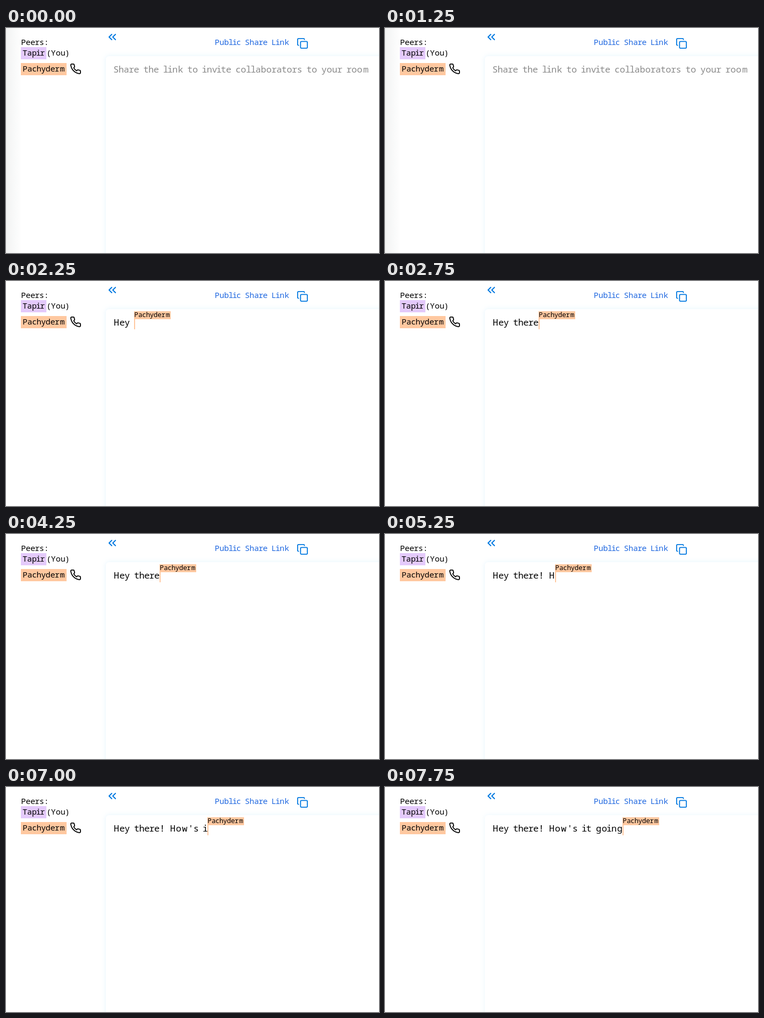
Write an HTML page with a canvas that moves like this. It is 702 px wide and 424 px high and loops after 8000 ms.

```html
<!DOCTYPE html>
<html lang="en">
<head>
<meta charset="utf-8">
<title>Shared editor</title>
<style>
  html, body { margin: 0; width: 100%; height: 100%; overflow: hidden; background: #fff; }
  canvas { display: block; }
</style>
</head>
<body>
<canvas id="stage" width="702" height="424"></canvas>
<script>
const ctx = document.getElementById("stage").getContext("2d");
const LOOP = 8000;
const BLUE = "#0078e0", LINK = "#2068e0", PEACH = "#ffc8a0", LILAC = "#e4cafb";
const ME = "Tapir", PEER = "Pachyderm";
const MESSAGE = "Hey there! How's it going";
const HINT = "Share the link to invite collaborators to your room";

// Time of each keystroke burst and how many characters are then visible.
const TYPING = [
  [1500, 1], [1750, 2], [2000, 3], [2250, 4], [2500, 6], [2750, 9],
  [4750, 10], [5250, 12], [5500, 13], [5750, 14], [6000, 15], [6250, 16],
  [7000, 18], [7250, 20], [7500, 21], [7750, 25]
];
const SLIP = { from: 3500, to: 4250, text: "@" };

// Character advances of the loosely monospaced face, at the body size.
const BODY = 17;
const ADVANCE = {};
for (const [chars, width] of [
  ["i", 7.7], ["()", 8.2], [" ", 8.5], ["l", 8.8], ["rv", 9], ["t", 9.3],
  ["ycL", 9.4], ["h", 9.7], ["eks", 9.8], ["o", 10.3], ["!", 10.4],
  ["PYn", 10.6], ["g", 11], ["H", 11.7], ["wm", 13], ["@", 14]
]) for (const c of chars) ADVANCE[c] = width;

const COPY = new Path2D("M10 8H20a2 2 0 0 1 2 2V20a2 2 0 0 1-2 2H10a2 2 0 0 1-2-2V10a2 2 0 0 1 2-2z" +
  "M4 16a2 2 0 0 1-2-2V4a2 2 0 0 1 2-2H14a2 2 0 0 1 2 2");
const CHEVRONS = new Path2D("M11 17L6 12L11 7M18 17L13 12L18 7");
const PHONE = new Path2D("M22 16.92v3a2 2 0 0 1-2.18 2 19.8 19.8 0 0 1-8.63-3.07 19.5 19.5 0 0 1-6-6" +
  "A19.8 19.8 0 0 1 2.12 4.18A2 2 0 0 1 4.11 2h3a2 2 0 0 1 2 1.72 12.8 12.8 0 0 0 .7 2.81" +
  "a2 2 0 0 1-.45 2.11L8.09 9.91a16 16 0 0 0 6 6l1.27-1.27a2 2 0 0 1 2.11-.45" +
  "a12.8 12.8 0 0 0 2.81.7A2 2 0 0 1 22 16.92z");

function box(color, x, y, w, h) {
  ctx.fillStyle = color;
  ctx.fillRect(x, y, w, h);
}

// Draws text and returns the x position after its last character.
function write(text, x, baseline, scale, color) {
  ctx.font = `${BODY * scale}px "Noto Sans Mono", monospace`;
  ctx.textAlign = "center";
  ctx.fillStyle = color;
  for (const c of text) {
    const width = (ADVANCE[c] || 10) * scale;
    ctx.fillText(c, x + width / 2, baseline);
    x += width;
  }
  return x;
}

// Icons are designed on a 24 unit grid.
function icon(path, cx, cy, size, color) {
  ctx.save();
  ctx.translate(cx, cy);
  ctx.scale(size / 24, size / 24);
  ctx.translate(-12, -12);
  ctx.strokeStyle = color;
  ctx.lineWidth = 2;
  ctx.lineCap = ctx.lineJoin = "round";
  ctx.stroke(path);
  ctx.restore();
}

function drawPage(t) {
  box("#fff", 0, 0, 702, 424);
  if (t < 2250) {
    const shade = ctx.createLinearGradient(0, 0, 30, 0);
    shade.addColorStop(0, "#f2f3f3");
    shade.addColorStop(1, "#ffffff");
    box(shade, 0, 0, 30, 424);
  }

  ctx.save();
  ctx.shadowColor = `rgba(0, 150, 240, ${t < 7500 ? 0.1 : 0.08})`;
  ctx.shadowBlur = 9;
  ctx.fillStyle = "#fff";
  ctx.beginPath();
  ctx.roundRect(188, 53, 560, 420, 6);
  ctx.fill();
  ctx.restore();

  write("Peers:", 28, 32, 0.89, "#000");
  box(LILAC, 28, 36, 48, 23);
  write(ME, 31, 52, 0.89, "#000");
  write("(You)", 77, 52, 0.89, "#000");
  box(PEACH, 28, 66, 86, 23);
  write(PEER, 31, 82, 0.89, "#000");
  icon(PHONE, 131, 77, 22, "#000");

  icon(CHEVRONS, 200, 17, 24, BLUE);
  write("Public Share Link", 392.5, 32, 0.88, LINK);
  icon(COPY, 558, 29, 22, BLUE);
}

function typedText(t) {
  let count = 0;
  for (const [time, length] of TYPING) if (t >= time) count = length;
  const slipped = t >= SLIP.from && t < SLIP.to;
  return MESSAGE.slice(0, count) + (slipped ? SLIP.text : "");
}

function drawEditor(t) {
  const text = typedText(t);
  if (!text) {
    write(HINT, 202, 84, 1, "#8a8a8a");
    return;
  }
  const caret = Math.round(write(text, 202, 84, 1, "#000"));
  box(PEACH, caret, 57, 2, 34);
  box(PEACH, caret, 57, 69, 15);
  write(PEER, caret, 68, 0.752, "#000");
}

function frame() {
  const t = performance.now() % LOOP;
  drawPage(t);
  drawEditor(t);
  requestAnimationFrame(frame);
}
frame();
</script>
</body>
</html>
```
